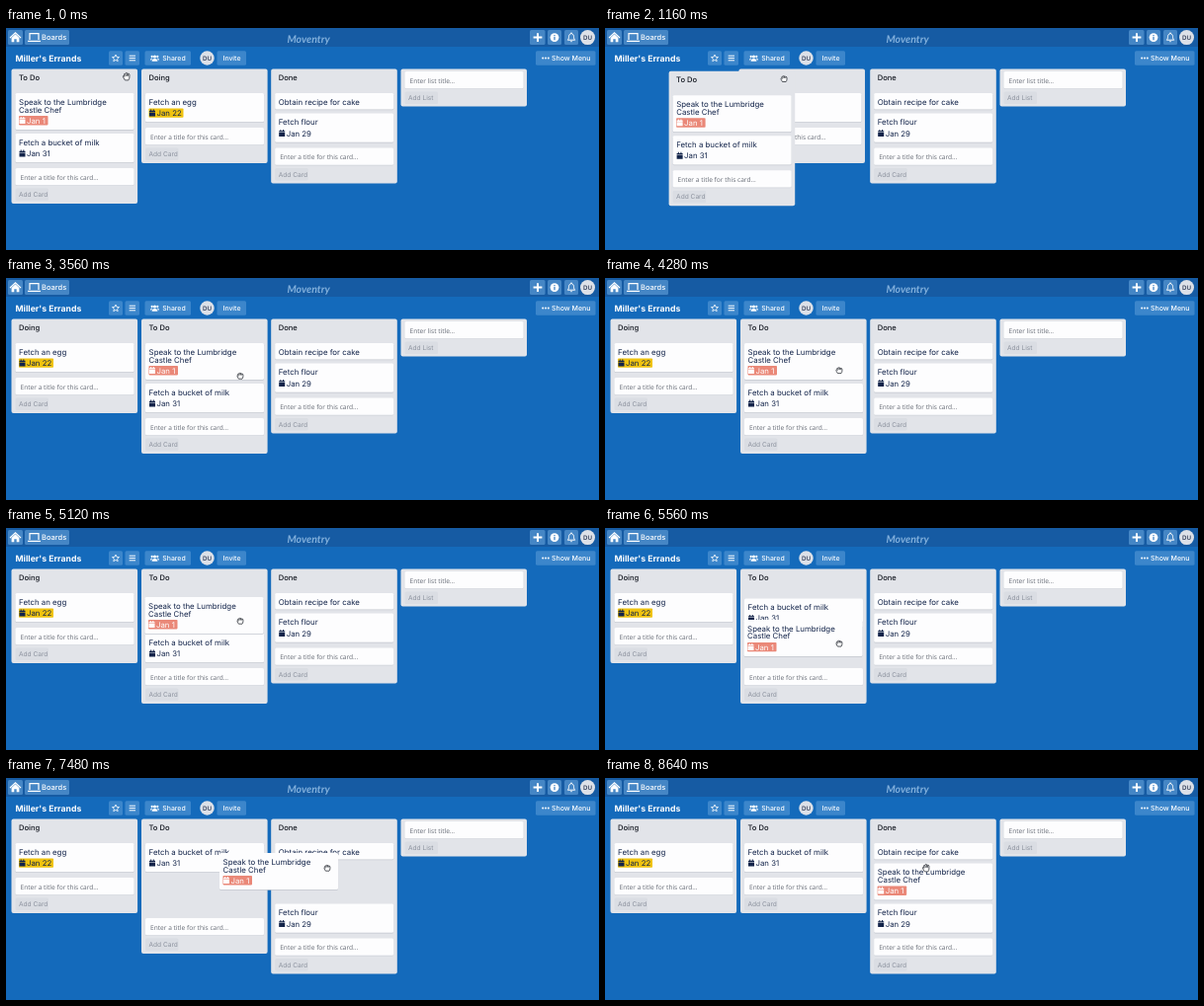
An HTML page that plays this animation: 600x225 px, repeating every 8720 ms.

```html
<!DOCTYPE html>
<html lang="en">
<head>
<meta charset="utf-8">
<title>Board</title>
<style>
  html, body { margin: 0; width: 100%; height: 100%; overflow: hidden; background: #146abb; }
  svg { display: block; width: 100%; height: 100%; }
  text { font-family: Inter, "Open Sans", sans-serif; text-rendering: geometricPrecision; white-space: pre; }
</style>
</head>
<body>
<svg id="stage" viewBox="0 0 600 225"></svg>
<script>
const LOOP = 8720;
const INK = '#13244a';
const stage = document.getElementById('stage');

function add(parent, tag, attrs = {}) {
  const node = document.createElementNS('http://www.w3.org/2000/svg', tag);
  for (const key in attrs) node.setAttribute(key, attrs[key]);
  parent.appendChild(node);
  return node;
}
const group = (parent, x = 0, y = 0) => add(parent, 'g', { transform: `translate(${x} ${y})` });
const rect = (parent, x, y, width, height, fill, rx = 0) =>
  add(parent, 'rect', { x, y, width, height, fill, rx });
const path = (parent, d, attrs) => add(parent, 'path', { d, ...attrs });

// y is the middle of the capital letters
function label(parent, x, y, size, fill, content, attrs = {}) {
  const node = add(parent, 'text', { x, y: y + size * 0.36, 'font-size': size, fill, ...attrs });
  node.textContent = content;
  return node;
}

function avatar(x, y, r) {
  add(stage, 'circle', { cx: x, cy: y, r, fill: '#dde1e8' });
  label(stage, x, y, 6.2, '#35415c', 'DU', { 'text-anchor': 'middle', 'font-weight': 600 });
}

function drawTopBar() {
  const white = '#fff';
  const line = { fill: 'none', stroke: white, 'stroke-width': 1.2 };
  rect(stage, 0, 0, 600, 19, '#165ba3');
  for (const [x, w] of [[2, 15], [19, 45], [530, 15.5], [548, 14], [565, 14]])
    rect(stage, x, 2, w, 15, '#4586c5', 1.5);

  path(stage, 'M4 10L9.5 4.8L15 10', line);
  path(stage, 'M5.6 9.9L9.5 6.3L13.4 9.9V14.2H10.7V11.2H8.3V14.2H5.6Z', { fill: white });
  path(stage, 'M24 12V5.7H33V12M22 13.3H35', line);
  label(stage, 36, 9.7, 7.5, white, 'Boards', { 'font-weight': 500 });

  label(stage, 306, 10.7, 10.6, '#82b0dc', 'Moventry', {
    'text-anchor': 'middle', 'font-style': 'italic', 'font-weight': 700,
    style: 'font-family: Lato, sans-serif'
  });

  path(stage, 'M538 5.2V14M533.6 9.6H542.4', { ...line, 'stroke-width': 2 });
  add(stage, 'circle', { cx: 555, cy: 9.6, r: 4.4, fill: white });
  path(stage, 'M555 7V8.2M555 9V12.2', { stroke: '#4586c5', 'stroke-width': 1.3 });
  path(stage, 'M568.3 12.2C569.6 11 569.4 9.5 569.5 8.5C570 4.7 574 4.7 574.5 8.5C574.6 9.5 574.4 11 575.7 12.2Z',
    { ...line, 'stroke-width': 1 });
  path(stage, 'M570.8 13.3H573.2L572 14.4ZM571.5 4.5H572.5V6H571.5Z', { fill: white });
  avatar(588.5, 9.6, 7.5);
}

function drawBoardBar() {
  const white = '#fff';
  label(stage, 9.5, 30.5, 8.7, white, "Miller's Errands", { 'font-weight': 700 });
  for (const [x, w] of [[104, 14], [120.5, 14.5], [140.5, 46.5], [213.5, 29.5], [536, 60.5]])
    rect(stage, x, 23.2, w, 14.5, '#3c86cb', 1.5);

  const star = Array.from({ length: 10 }, (_, i) => {
    const r = i % 2 ? 1.7 : 3.7, a = i * Math.PI / 5;
    return [111 + r * Math.sin(a), 30.7 - r * Math.cos(a)];
  });
  add(stage, 'polygon', { points: star.join(' '), fill: 'none', stroke: white, 'stroke-width': 0.8 });
  path(stage, 'M124.7 28.2H131M124.7 30.5H131M124.7 32.8H131', { stroke: white, 'stroke-width': 1 });

  for (const [x, y, r] of [[147.7, 28.9, 1.1], [153.3, 28.9, 1.1], [150.5, 29, 1.6]])
    add(stage, 'circle', { cx: x, cy: y, r, fill: white });
  path(stage, 'M147.6 33.8Q147.6 31 150.5 31T153.4 33.8ZM146 32.4Q146 30.5 148.2 30.6L147.1 32.4ZM155 32.4Q155 30.5 152.8 30.6L153.9 32.4Z',
    { fill: white });
  label(stage, 158.3, 30.5, 6.9, white, 'Shared', { 'font-weight': 500 });
  avatar(203.5, 30.5, 7.2);
  label(stage, 219.5, 30.5, 6.9, white, 'Invite', { 'font-weight': 500 });
  for (const x of [543.2, 546, 548.8])
    add(stage, 'circle', { cx: x, cy: 30.5, r: 1, fill: white });
  label(stage, 552, 30.5, 7, white, 'Show Menu', { 'font-weight': 500 });
}

function makeForm(parent, hint, action, y) {
  const form = group(parent, 4, y);
  rect(form, 0, 0.4, 120, 17.5, '#cfd3da', 1.5);
  rect(form, 0, 0, 120, 17.2, '#fdfdfe', 1.5);
  label(form, 5, 9.4, 6.6, '#666b75', hint, { style: 'font-family: "Open Sans", sans-serif' });
  rect(form, 0, 20.5, 33.5, 12.5, '#dadde3', 1.5);
  label(form, 3.5, 26.7, 6.6, '#8d939f', action);
  return form;
}

function makeList(x, title) {
  const root = group(stage, x);
  const panel = rect(root, 0, 41.5, 127.6, 95.5, '#e2e4e9', 2);
  label(root, 7.5, 50.4, 7.6, '#141821', title, { 'font-weight': 500 });
  const form = makeForm(root, 'Enter a title for this card...', 'Add Card', 101);
  return { root, panel, form, x };
}

function makeCard(parent, y, lines, date, tint, dateInk = INK) {
  const card = group(parent, 4, y);
  const height = 16.5 + (lines.length - 1) * 7.8 + (date ? 12.7 : 0);
  rect(card, 0, 0.8, 120, height, '#c3c7cf', 1.5);
  rect(card, 0, 0, 120, height, '#fdfdfe', 1.5);
  lines.forEach((s, i) => label(card, 3.6, 8.9 + i * 7.8, 7.85, INK, s));
  if (date) {
    const due = group(card, 3.5, 20 + (lines.length - 1) * 7.6);
    if (tint) rect(due, 0, -4.6, date.length > 5 ? 35 : 29.5, 9.4, tint, 0.8);
    path(due, 'M.5-2.3h6v1.3h-6zM.5-.6h6v4h-6zM1.7-3.5h1v1.3h-1zM4.3-3.5h1v1.3h-1z', { fill: dateInk });
    label(due, 8, 0.2, 7.8, dateInk, date);
  }
  return card;
}

drawTopBar();
drawBoardBar();

const doing = makeList(137, 'Doing');
makeCard(doing.root, 66, ['Fetch an egg'], 'Jan 22', '#f0c30f');

const done = makeList(268.2, 'Done');
makeCard(done.root, 66, ['Obtain recipe for cake']);
const flour = makeCard(done.root, 86.5, ['Fetch flour'], 'Jan 29');

const extra = group(stage, 399.5);
rect(extra, 0, 41.5, 127.5, 38, '#e2e4e9', 2);
makeForm(extra, 'Enter list title...', 'Add List', 44);

const todo = makeList(5.5, 'To Do');
const bucket = makeCard(todo.root, 107, ['Fetch a bucket of milk'], 'Jan 31');
const speak = makeCard(stage, 66, ['Speak to the Lumbridge', 'Castle Chef'], 'Jan 1', '#ea8878', '#fff');

const cursor = group(stage);
const handStyle = { fill: '#fff', stroke: '#20242c', 'stroke-width': 0.75, 'stroke-linejoin': 'round' };
const shapes = {
  arrow: path(cursor, 'M-2-4V3.2L-.4 1.8L.7 4.3L1.9 3.7L.8 1.4H3Z',
    { fill: '#111', stroke: '#fff', 'stroke-width': 0.5 }),
  open: path(cursor, 'M-1.6 3.9L-3.5.7Q-4.1-.6-2.9-.5L-2 .4L-2.5-2.2Q-1.9-3.4-1.2-2.4Q-.6-4.6.3-3Q1.1-4 1.6-2.6Q2.6-3.1 2.9-1.8V1Q2.8 2.6 1.9 3.9ZM-1.1-2.3L-.7-.2M.4-2.9V-.3M1.7-2.5L1.4-.2', handStyle),
  fist: path(cursor, 'M-1.6 3.2L-2.8 1.1Q-3.5-.3-2.4-.8Q-2.5-2.4-1.2-2.2Q-.5-3 .3-2.3Q1.2-2.8 1.6-1.9Q2.8-2.2 2.9-.8V.8Q2.8 2.2 2 3.2ZM-1.9-.7V.5M-.9-2V-.5M.4-2.2V-.5M1.7-1.8V-.4', handStyle)
};

// Each stop is [time, x, y]; motion eases from one stop to the next.
const track = {
  todo: [[900, 5.5, 0], [1450, 133.5, 5], [1520, 133.5, 5], [1700, 137, 0]],
  doing: [[1150, 137, 0], [1320, 5.5, 0]],
  speak: [[900, 9.5, 66], [1450, 137.5, 71], [1520, 137.5, 71], [1700, 141, 66],
    [5040, 141, 66], [5120, 140.5, 70], [5850, 140.5, 105], [5960, 140.5, 104], [6120, 141, 99],
    [6850, 141, 99], [7400, 216, 76], [8020, 216, 76], [8240, 272.2, 86.5]],
  bucket: [[5430, 4, 107], [5600, 4, 66]],
  flour: [[7260, 4, 86.5], [7400, 4, 127.5]],
  todoForm: [[8239, 4, 142], [8240, 4, 101]],
  doneForm: [[7260, 4, 121.5], [7400, 4, 162.5]],
  cursor: [[900, 122, 49], [1450, 250, 54], [1520, 250, 54], [1780, 254, 59], [2000, 254, 59],
    [3300, 237, 99], [3700, 237, 99], [4700, 237, 90], [5040, 237, 90], [5120, 237, 94],
    [5850, 237, 129], [5960, 237, 128], [6400, 242, 117], [6600, 242, 117],
    [6800, 250, 114], [6850, 250, 114], [7400, 325, 91]]
};
const cursorShape = [[0, 'open'], [880, 'fist'], [1540, 'open'], [1640, 'arrow'], [2250, 'open'],
  [3480, 'fist'], [6000, 'open'], [6820, 'fist'], [8040, 'open']];

function at(stops, t) {
  const i = stops.findIndex(s => s[0] > t);
  if (i < 0) return stops[stops.length - 1].slice(1);
  if (i === 0) return stops[0].slice(1);
  const a = stops[i - 1], b = stops[i];
  const u = (t - a[0]) / (b[0] - a[0]);
  const k = u * u * (3 - 2 * u);
  return [a[1] + (b[1] - a[1]) * k, a[2] + (b[2] - a[2]) * k];
}

function place(node, [x, y]) {
  node.setAttribute('transform', `translate(${x} ${y})`);
}

function placeForm(list, pos) {
  place(list.form, pos);
  list.panel.setAttribute('height', pos[1] - 5.5);
}

function render(t) {
  place(todo.root, at(track.todo, t));
  place(doing.root, at(track.doing, t));
  place(speak, at(track.speak, t));
  place(bucket, at(track.bucket, t));
  place(flour, at(track.flour, t));
  placeForm(todo, at(track.todoForm, t));
  placeForm(done, at(track.doneForm, t));
  place(cursor, at(track.cursor, t));
  const current = cursorShape.filter(s => s[0] <= t).pop()[1];
  for (const name in shapes)
    shapes[name].setAttribute('visibility', name === current ? 'visible' : 'hidden');
}

const start = performance.now();
function tick() {
  render((performance.now() - start) % LOOP);
  requestAnimationFrame(tick);
}
tick();
</script>
</body>
</html>
```
